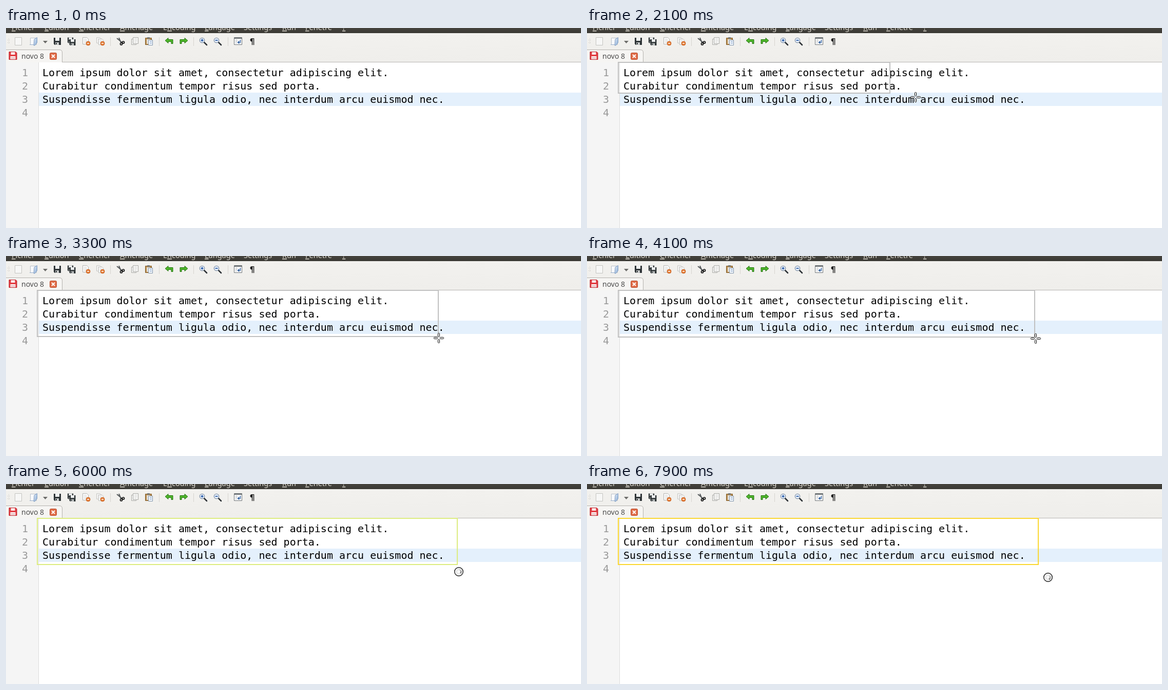
An HTML page for the animation above (8000 ms loop, 1120 by 390 pixels).

```html
<!DOCTYPE html>
<html lang="fr">
<head>
<meta charset="utf-8">
<title>Text editor capture</title>
<style>
html, body { margin: 0; width: 100%; height: 100%; overflow: hidden; background: #fff; }
svg { display: block; }
text { white-space: pre; }
.menu { font: 14.5px "Noto Sans", "Open Sans", sans-serif; fill: #dfdbd2; }
.menu .key { text-decoration: underline; }
.tab { font: 14px "Noto Sans", "Open Sans", sans-serif; fill: #4c4c4c; }
.code { font: 20px "DejaVu Sans Mono", monospace; fill: #000; }
.num { fill: #999; text-anchor: end; }
</style>
</head>
<body>
<svg width="1120" height="390" viewBox="0 0 1120 390">
<defs>
  <linearGradient id="bar" x2="0" y2="1"><stop stop-color="#45433d"/><stop offset="1" stop-color="#3a3934"/></linearGradient>
  <linearGradient id="strip" x2="0" y2="1"><stop stop-color="#f2f1ee"/><stop offset="1" stop-color="#efeeeb"/></linearGradient>
  <linearGradient id="blue" x2="1" y2="1"><stop stop-color="#eef4fb"/><stop offset="1" stop-color="#7fa6d4"/></linearGradient>
  <g id="page">
    <path d="M-6.5-7.5h13v15h-13z" fill="#f7f7f6" stroke="#c3c3c0"/>
  </g>
  <g id="sheet">
    <path d="M-5.5-6.5h8l3 3v10h-11z" fill="#fafafa" stroke="#b5b5b2"/>
    <path d="M-3-3h5M-3 0h6M-3 3h6" stroke="#cfcfcc"/>
  </g>
  <g id="minus">
    <circle r="4" fill="#e27a35" stroke="#c65f1e" stroke-width=".8"/>
    <path d="M-2 0h4" stroke="#fff" stroke-width="1.5"/>
  </g>
  <g id="disk">
    <path d="M-7-7h14v14h-12l-2-2z" fill="#2e3436"/>
    <path d="M-4-7h8v6h-8z" fill="#eef0f0"/>
    <path d="M-4 2h7v5h-7z" fill="#c9cccc"/>
    <path d="M-3 3h2v3h-2z" fill="#2e3436"/>
  </g>
  <g id="arrow">
    <path d="M-8-1.500l6-5v3h9v8h-3v-4h-6v3z" fill="#4fb52c" stroke="#20730d" stroke-linejoin="round"/>
  </g>
  <g id="lens">
    <path d="M2 2l5 5" stroke="#2d3237" stroke-width="2.600" stroke-linecap="round"/>
    <circle cx="-2" cy="-2" r="4.700" fill="#e8f0fa" stroke="#8393a8" stroke-width="1.300"/>
    <path d="M-4.500-2h5" stroke="#2356a5" stroke-width="1.700"/>
  </g>
  <g id="arm"><rect x="2.500" y="-1.500" width="7" height="3" rx="1" fill="#fff" stroke="#000"/></g>
</defs>

<rect width="1120" height="390" fill="#fff"/>
<rect y="10" width="1120" height="57" fill="url(#strip)"/>
<rect width="1120" height="10" fill="url(#bar)"/>
<g id="menu" class="menu"></g>

<path d="M5.500 20v12M3 23.500h4M3 28.500h4" stroke="#c9c7c2" stroke-dasharray="1 2" fill="none"/>
<path d="M203.500 18v17M298.500 18v17M365.500 18v17M432.500 18v17" stroke="#d6d4cf"/>

<use href="#page" x="24" y="26"/>
<g transform="translate(54 26)">
  <path d="M-6.500-6.500h12v13h-12z" fill="#f8f9fb" stroke="#b9c0c9"/>
  <path d="M1-4l5.500-3.500v10l-4.500 5.500h-2z" fill="url(#blue)" stroke="#7896bd" stroke-width=".9"/>
  <path d="M-8 6.500h9" stroke="#98afcd"/>
</g>
<path d="M72 25h9l-4.500 5z" fill="#6b6b68"/>
<use href="#disk" x="100" y="26"/>
<use href="#disk" transform="translate(125.500 24) scale(.8)"/>
<use href="#disk" transform="translate(129.500 28) scale(.85)"/>
<use href="#sheet" x="155" y="25"/><use href="#minus" x="160" y="30"/>
<use href="#sheet" transform="translate(181 24) scale(.8)"/>
<use href="#sheet" transform="translate(185 27) scale(.85)"/><use href="#minus" x="188" y="30"/>

<g transform="translate(223 26)" fill="none">
  <path d="M-7-6L4 3M-3-7L1 3" stroke="#55595b" stroke-width="2"/>
  <circle cx="1.500" cy="5" r="2" stroke="#111" stroke-width="1.700"/>
  <circle cx="5.500" cy="2" r="2" stroke="#111" stroke-width="1.700"/>
</g>
<g transform="translate(251 26)" fill="#f5f5f4" stroke="#a9a9a5">
  <path d="M-6.500-4.500h9v11h-9z"/>
  <path d="M-3.500-7.500h10v12h-10z"/>
  <path d="M-1-4.500h5M-1-1.500h5M-1 1.500h4" stroke="#d4d4d1"/>
</g>
<g transform="translate(279 26)">
  <path d="M-7.500-6.500h12v13h-12z" fill="#b98b4b" stroke="#7f5b28"/>
  <path d="M-4-8h5v3h-5z" fill="#777b7c"/>
  <path d="M-5-4h7v9h-7z" fill="#e4e2dc"/>
  <path d="M-1.500-2.500h8v10h-8z" fill="#f1f5fa" stroke="#8195ad"/>
  <path d="M1 .5h4M1 3.500h4" stroke="#7d9ec8"/>
</g>
<use href="#arrow" x="318" y="26"/>
<use href="#arrow" transform="translate(346 26) scale(-1 1) rotate(0)"/>
<use href="#lens" x="384" y="26"/>
<path d="M382 21.500v5" stroke="#2356a5" stroke-width="1.700"/>
<use href="#lens" x="412" y="26"/>
<g transform="translate(452 26)" fill="none">
  <path d="M-7.500-7.500h15v14h-15z" fill="#fff" stroke="#6e7376"/>
  <path d="M-7-6h14" stroke="#6e7376" stroke-width="2"/>
  <path d="M-5-2.500h4M-5 .5h3M-5 3.500h2" stroke="#a2a6a8"/>
  <path d="M4.500-3v5h-4M2.500-.5l-3 2.500l3 2.500" stroke="#2f5f9f" stroke-width="1.400"/>
</g>
<text x="474.500" y="32" style="font:bold 16px 'DejaVu Sans',sans-serif" fill="#222">¶</text>

<path d="M0 66.500h1120" stroke="#b7b5b2"/>
<path d="M-1 67v-24.500h105q5.500 0 5.500 5.500v19" fill="#f6f5f3" stroke="#b4b2ae"/>
<g transform="translate(13.500 54)">
  <path d="M-7.500-7.500h13l2 2v13h-15z" fill="#e23b40" stroke="#b91f28"/>
  <path d="M-4-7h8v5h-8z" fill="#fbe9e9"/>
  <path d="M-5 1h10v6h-10z" fill="#fff"/>
  <path d="M-4 3.500h8M-4 5.500h8" stroke="#dd9c9e"/>
</g>
<text class="tab" x="30" y="60">novo 8</text>
<rect x="85.500" y="48.500" width="13" height="13" rx="2" fill="#e06c48" stroke="#b94c2c"/>
<path d="M89 52l6 6M95 52l-6 6" stroke="#fff" stroke-width="2"/>

<rect y="67" width="63" height="323" fill="#f5f5f5"/>
<path d="M63.500 67v323" stroke="#dcdcdc"/>
<rect x="64" y="126" width="1056" height="26" fill="#e4f0fc"/>
<g id="code" class="code"></g>

<rect id="frame" x="61" y="67" fill="none" stroke-width="2"/>
<g id="cross">
  <use href="#arm"/><use href="#arm" transform="rotate(90)"/>
  <use href="#arm" transform="rotate(180)"/><use href="#arm" transform="rotate(270)"/>
</g>
<g id="wait">
  <circle r="9.300" fill="#bbb" opacity=".45"/>
  <circle r="8.300" fill="#fafafa" stroke="#222" stroke-width="1.400"/>
  <g id="spokes"></g>
</g>
</svg>
<script>
const LOOP = 8000, STEP = 100;
const $ = id => document.getElementById(id);

// Underscore marks the shortcut letter.
const menu = [[11, "_Fichier"], [75, "_Edition"], [142, "_Chercher"], [222, "_Affichage"],
  [306, "E_ncoding"], [387, "_Langage"], [463, "Settin_gs"], [538, "_Run"], [583, "_Fenêtre"], [655, "_?"]];
$("menu").innerHTML = menu.map(([x, s]) =>
  `<text x="${x}" y="4">${s.replace(/_(.)/, '<tspan class="key">$1</tspan>')}</text>`).join("");

const lines = ["Lorem ipsum dolor sit amet, consectetur adipiscing elit.",
  "Curabitur condimentum tempor risus sed porta.",
  "Suspendisse fermentum ligula odio, nec interdum arcu euismod nec.", ""];
$("code").innerHTML = lines.map((s, i) => {
  const y = 94 + 26 * i;
  return `<text class="num" x="43" y="${y}">${i + 1}</text><text x="71" y="${y}">${s}</text>`;
}).join("");

$("spokes").innerHTML = Array.from({ length: 12 }, (_, i) =>
  `<path d="M3 0h3" stroke="#333" stroke-width="1.4" opacity="${Math.max(.15, 1 - i * .22)}" transform="rotate(${-30 * i})"/>`).join("");

// Pointer path: time, x, y
const path = [[300, 361, 52], [400, 626, 80], [500, 626, 80], [700, 775, 135], [800, 640, 118],
  [1000, 210, 78], [1100, 90, 72], [1200, 62, 71], [1400, 62, 69], [1500, 62, 69],
  [1700, 150, 82], [2100, 640, 135], [2300, 799, 151], [2400, 770, 151], [2500, 700, 151],
  [2600, 655, 150], [2800, 710, 154], [3000, 810, 159], [3200, 843.4, 159.5], [3300, 843, 160],
  [3600, 868, 161], [3900, 868, 161], [4300, 880.8, 160], [4600, 880.8, 160], [4700, 881, 159],
  [5500, 881, 160], [6000, 882, 171], [6400, 898, 183], [7300, 898, 182]];
// Frame colour: time, r, g, b
const tint = [[4600, 192, 192, 192], [5000, 206, 211, 166], [6000, 220, 236, 128], [6400, 250, 215, 50]];

function at(keys, t) {
  const n = keys.findIndex(k => k[0] >= t);
  if (n < 0) return keys[keys.length - 1].slice(1);
  if (n === 0) return keys[0].slice(1);
  const a = keys[n - 1], b = keys[n], p = (t - a[0]) / (b[0] - a[0]);
  return a.slice(1).map((v, i) => v + (b[i + 1] - v) * p);
}
const show = (el, on) => el.setAttribute("visibility", on ? "visible" : "hidden");

function draw(ms) {
  const t = Math.floor(ms % LOOP / STEP) * STEP;
  const [x, y] = at(path, t).map(Math.round);
  const busy = t >= 4700;
  const pointer = busy ? $("wait") : $("cross");
  show($("cross"), t >= 300 && !busy);
  show($("wait"), busy);
  pointer.setAttribute("transform", `translate(${x} ${y})`);
  $("spokes").setAttribute("transform", `rotate(${(t - 5000) * .39})`);

  // The dragged corner trails the pointer slightly.
  const [cx, cy] = at(path, Math.min(t, 4500) - 40);
  const frame = $("frame");
  show(frame, t >= 1600);
  frame.setAttribute("width", Math.max(1, Math.round(cx - 1.4) - 61));
  frame.setAttribute("height", Math.max(1, Math.round(cy - 2.6) - 67));
  frame.setAttribute("stroke", `rgb(${at(tint, t).map(Math.round)})`);
}

const start = performance.now();
function tick() {
  draw(performance.now() - start);
  requestAnimationFrame(tick);
}
draw(0);
requestAnimationFrame(tick);
</script>
</body>
</html>
```
